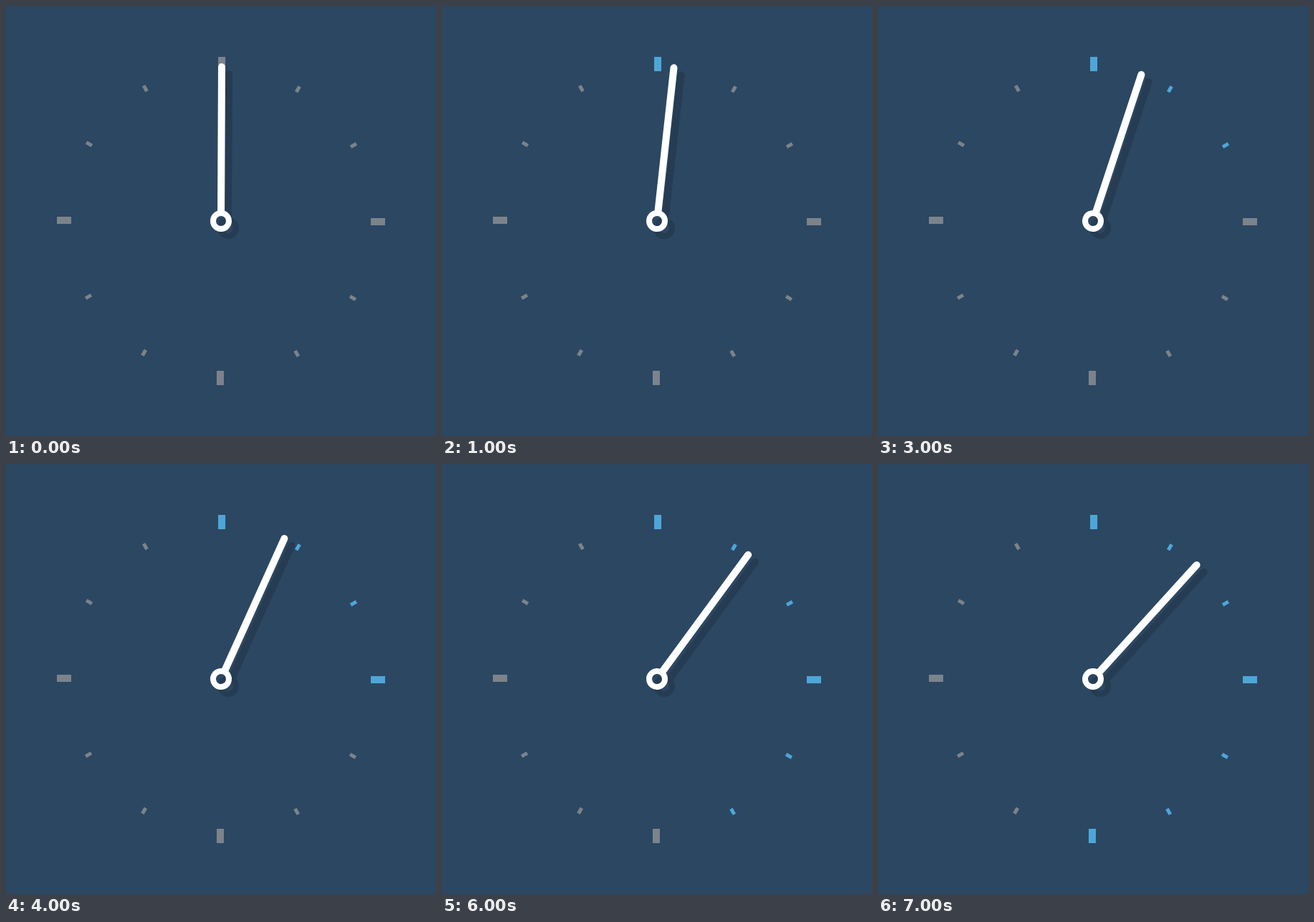
An HTML page with a canvas for the animation above (8000 ms loop, 600 by 600 pixels).

```html
<!DOCTYPE html>
<html lang="en">
<head>
<meta charset="utf-8">
<title>Clock</title>
<style>
  html, body { margin: 0; width: 100%; height: 100%; overflow: hidden; background: #2c4762; }
  canvas { display: block; width: 600px; height: 600px; }
</style>
</head>
<body>
<canvas id="stage" width="600" height="600"></canvas>
<script>
const ctx = document.getElementById('stage').getContext('2d');
const LOOP = 8000, STEP = 1000;
const OFFSET = 0.27; // the whole dial leans slightly clockwise
const COLORS = { back: '#2c4762', shade: '#263c53', off: '#7b838b', on: '#4ea6d8', hand: '#fff' };
const rad = deg => deg * Math.PI / 180;

function drawTick(i, lit) {
  const [w, h, r] = i % 3 ? [5, 9, 213] : [10, 20, 219];
  ctx.save();
  ctx.translate(300, 300);
  ctx.rotate(rad(i * 30 + OFFSET));
  ctx.fillStyle = lit ? COLORS.on : COLORS.off;
  ctx.fillRect(-w / 2, -r - h / 2, w, h);
  ctx.restore();
}

function drawHand(x, y, angle, color) {
  ctx.save();
  ctx.translate(x, y);
  ctx.rotate(rad(angle));
  ctx.strokeStyle = color;
  ctx.lineCap = 'round';
  ctx.lineWidth = 10;
  ctx.beginPath();
  ctx.moveTo(0, -13);
  ctx.lineTo(0, -215);
  ctx.stroke();
  ctx.lineWidth = 8;
  ctx.beginPath();
  ctx.arc(0, 0, 11, 0, Math.PI * 2);
  ctx.stroke();
  ctx.restore();
}

function draw(time) {
  const sec = Math.floor((time % LOOP) / STEP);
  const angle = sec * 6 + OFFSET;
  ctx.fillStyle = COLORS.back;
  ctx.fillRect(0, 0, 600, 600);
  for (let i = 0; i < 12; i++) drawTick(i, i < sec);
  drawHand(310, 310, angle, COLORS.shade);
  drawHand(300, 300, angle, COLORS.hand);
}

const start = performance.now();
function frame() {
  draw(performance.now() - start);
  requestAnimationFrame(frame);
}
frame();
</script>
</body>
</html>
```
